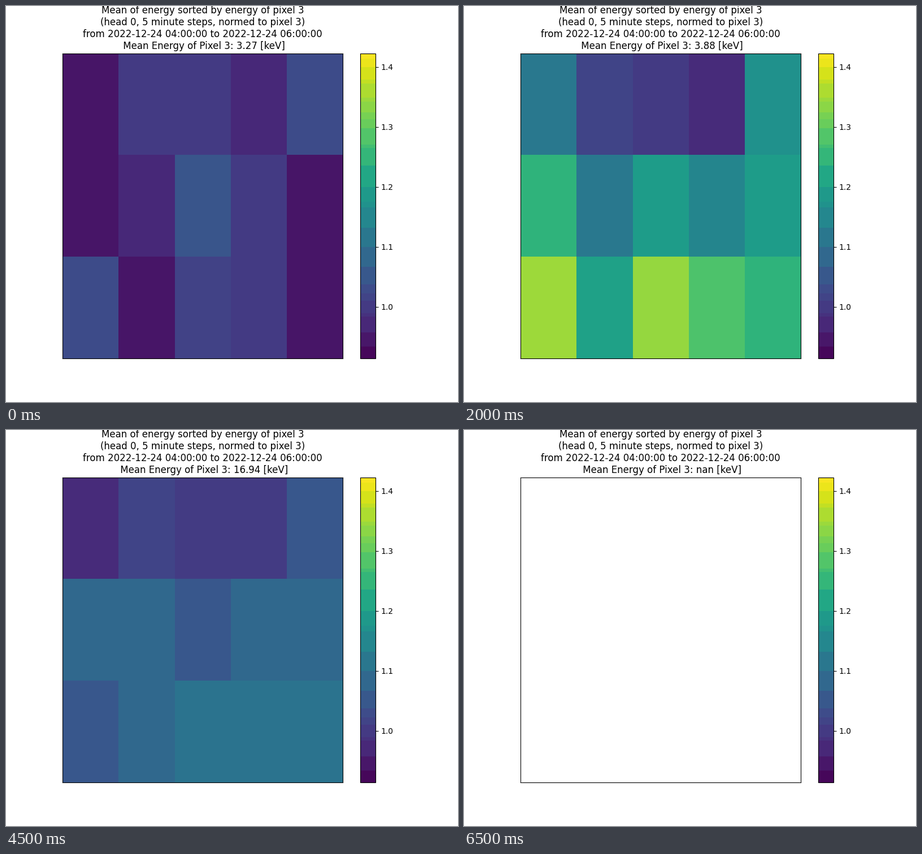
Animation, 800 px wide and 700 px high, one loop 8 s. Source, as a matplotlib script:

```python
import math

import matplotlib.pyplot as plt
import numpy as np
from matplotlib.animation import FuncAnimation
from matplotlib.cm import ScalarMappable
from matplotlib.colors import ListedColormap, Normalize

STEP_MS = 500
STEPS = 16
LAST_STEP = 12  # later steps hold no data
V_MIN, V_MAX = 0.9137, 1.4226
BAR_HEIGHT = 539

# Steps with measured heat maps; the ones between are interpolated.
KEY_STEPS = [0, 2, 4, 6, 9, 12]
ENERGIES = [3.27, 3.43, 3.88, 5.36, 16.94, 56.93]

# Ratios to pixel 3, in thousandths, row by row from the top left.
RATIOS = np.array([
    [943, 1000, 1000, 972, 1030,
     943, 972, 1047, 1000, 943,
     1030, 943, 1015, 1000, 943],
    [1047, 1002, 1002, 972, 1112,
     1112, 1070, 1112, 1112, 1112,
     1204, 1112, 1204, 1188, 1145],
    [1118, 1019, 1000, 976, 1171,
     1244, 1118, 1195, 1145, 1195,
     1348, 1204, 1342, 1281, 1244],
    [1086, 1030, 1000, 924, 972,
     1279, 1139, 1112, 1086, 1030,
     1343, 1195, 1279, 1279, 1317],
    [976, 1019, 1002, 1002, 1052,
     1086, 1086, 1052, 1086, 1086,
     1052, 1086, 1107, 1107, 1107],
    [1000, 972, 1000, 1000, 950,
     1015, 1000, 1000, 1015, 1000,
     972, 972, 983, 1000, 972],
]) / 1000

# Upper edges of the colour bar's steps, in pixels from its foot.
BAND_EDGES = [0, 21, 46, 74, 80, 102, 115, 131, 162, 197, 231, 267, 277,
              303, 341, 372, 378, 407, 423, 435, 454, 461, 486, 493,
              515, 530, BAR_HEIGHT]


def banded_viridis():
    """Viridis in flat steps, each in the colour of its middle."""
    edges = np.array(BAND_EDGES)
    middles = (edges[:-1] + edges[1:]) / 2 / BAR_HEIGHT
    colors = plt.get_cmap("viridis")(middles)
    return ListedColormap(np.repeat(colors, np.diff(edges), axis=0))


def ratios_at(step):
    if step > LAST_STEP:
        return np.full((3, 5), np.nan)
    cells = [np.interp(step, KEY_STEPS, track) for track in RATIOS.T]
    return np.reshape(cells, (3, 5))


def energy_at(step):
    if step > LAST_STEP:
        return math.nan
    return math.exp(np.interp(step, KEY_STEPS, np.log(ENERGIES)))


def title_at(step):
    return ("Mean of energy sorted by energy of pixel 3\n"
            "(head 0, 5 minute steps, normed to pixel 3)\n"
            "from 2022-12-24 04:00:00 to 2022-12-24 06:00:00\n"
            f" Mean Energy of Pixel 3: {energy_at(step):.2f} [keV]")


fig, ax = plt.subplots(figsize=(8, 7), dpi=100)
norm = Normalize(V_MIN, V_MAX)
heat_map = ax.imshow(ratios_at(0), cmap="viridis", norm=norm,
                     aspect="auto", interpolation="nearest")
ax.set(xticks=[], yticks=[])
title = ax.set_title(title_at(0))
fig.colorbar(ScalarMappable(norm, banded_viridis()), ax=ax,
             ticks=[1.0, 1.1, 1.2, 1.3, 1.4])


def update(step):
    heat_map.set_data(ratios_at(step))
    title.set_text(title_at(step))
    return heat_map, title


animation = FuncAnimation(fig, update, frames=STEPS, interval=STEP_MS,
                          repeat=True, repeat_delay=0, blit=False)
plt.show()
```
